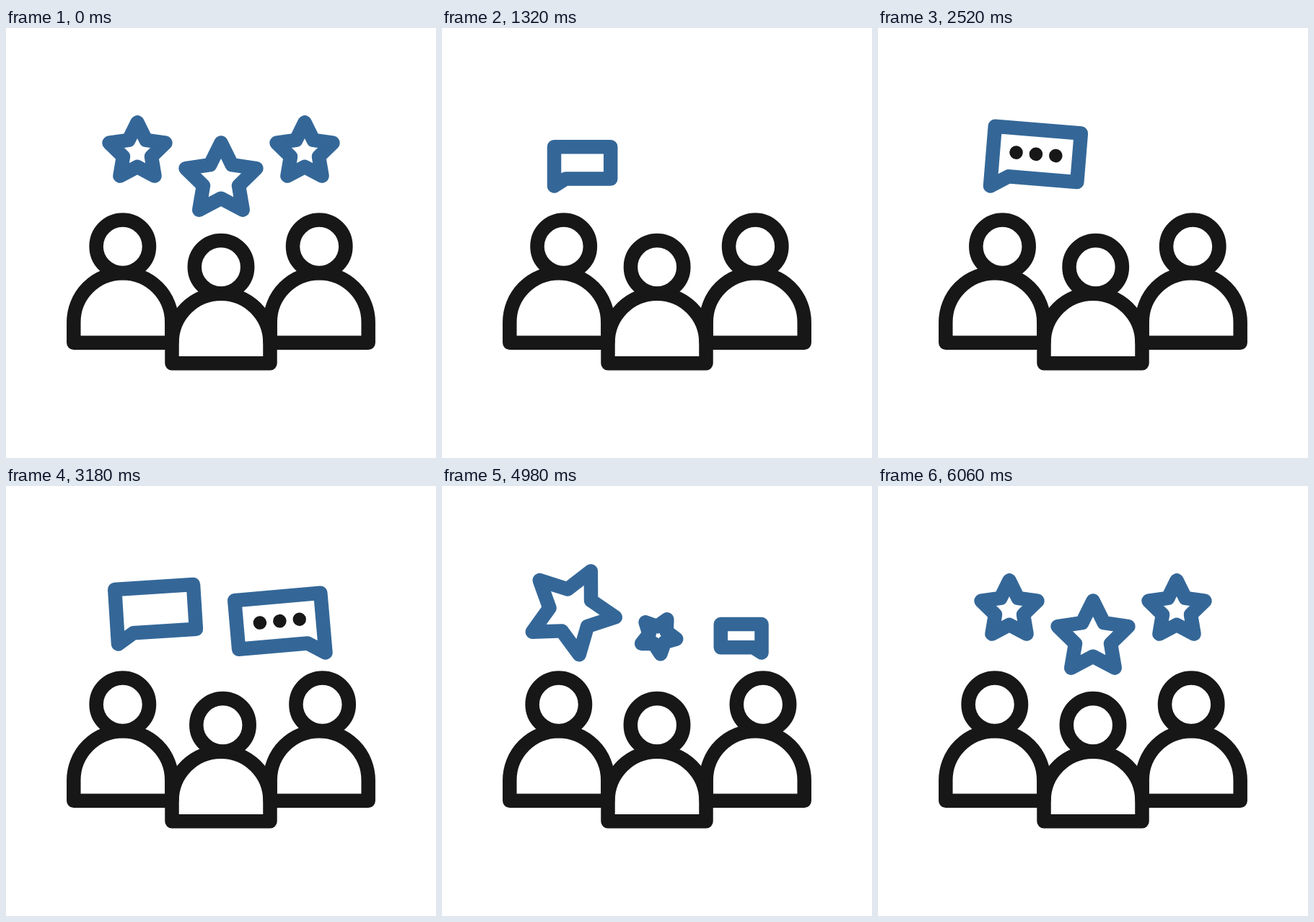
These frames come from a looping animation (596 by 596 pixels, 6300 ms). An HTML page with a canvas:

```html
<!DOCTYPE html>
<html lang="en">
<head>
<meta charset="utf-8">
<title>Team feedback</title>
<style>
  html, body { margin: 0; width: 100%; height: 100%; overflow: hidden; background: #fff; }
  canvas { display: block; width: 596px; height: 596px; }
</style>
</head>
<body>
<canvas id="stage" width="596" height="596"></canvas>
<script>
const ctx = document.getElementById('stage').getContext('2d');
const LOOP = 6300, STEP = 30, LAST = 6060;
const BLUE = '#346798', INK = '#171717', LINE = 19.5;
const RAD = Math.PI / 180;

const people = [
  { x: 161.8, y: 302.7, nod: 0, beat: 1020 },
  { x: 434.2, y: 302.7, nod: 2372, beat: 1037 },
  { x: 298, y: 331.2, nod: 1285, beat: 1030 }
];

// hide / show: when each star starts to leave and to return
const stars = [
  { x: 182, y: 168, r: 41, peak: 1.5, hide: 114, show: 4515 },
  { x: 298, y: 205.6, r: 51.5, peak: 1.31, hide: 262, show: 4790 },
  { x: 414, y: 168, r: 41, peak: 1.5, hide: 400, show: 5155 }
];

// side: direction from the tail to the rest of the bubble
const bubbles = [
  { x: 155.5, y: 219, side: 1, dots: [1450, 2850],
    size: [[1080, 0], [1480, 1], [3090, 1], [3560, 0]],
    tilt: [[1380, 0], [1690, 5], [2130, -5], [2570, 5], [3010, -5], [3490, 0]] },
  { x: 443, y: 231, side: -1, dots: [2880, 4460],
    size: [[2540, 0], [2940, 1], [4740, 1], [5205, 0]],
    tilt: [[2860, 0], [3165, -5], [3680, 5], [4195, -5], [4700, 5], [4950, 0]] }
];

const wave = u => (1 - Math.cos(Math.PI * u)) / 2;

// Eased value at time t from a list of [time, value] keys
function tween(keys, t) {
  if (t <= keys[0][0]) return keys[0][1];
  for (let i = 1; i < keys.length; i++) {
    const [t0, a] = keys[i - 1], [t1, b] = keys[i];
    if (t < t1) return a + (b - a) * wave((t - t0) / (t1 - t0));
  }
  return keys[keys.length - 1][1];
}

function strokePoly(points, color) {
  ctx.beginPath();
  points.forEach(([x, y]) => ctx.lineTo(x, y));
  ctx.closePath();
  ctx.strokeStyle = color;
  ctx.stroke();
}

function placed(x, y, degrees, draw) {
  ctx.save();
  ctx.translate(x, y);
  ctx.rotate(degrees * RAD);
  draw();
  ctx.restore();
}

function drawPerson(p, t) {
  const cycles = (t - p.nod) / p.beat;
  const shift = cycles > 0 && cycles < 3 ? 10.8 * wave(2 * cycles) : 0;
  const base = p.y + 133.6, shoulder = p.y + 105.1;
  ctx.strokeStyle = INK;
  ctx.beginPath();
  ctx.moveTo(p.x - 68, base);
  ctx.lineTo(p.x - 68, shoulder);
  ctx.arc(p.x, shoulder, 68, Math.PI, 0);
  ctx.lineTo(p.x + 68, base);
  ctx.closePath();
  ctx.stroke();
  ctx.beginPath();
  ctx.arc(p.x + shift, p.y, 36.7, 0, 2 * Math.PI);
  ctx.stroke();
}

function drawStar(s, t) {
  const { hide, show, peak } = s;
  const size = tween([[hide, 1], [hide + 450, peak], [hide + 900, 0],
                      [show, 0], [show + 450, peak], [show + 900, 1]], t);
  if (size < 0.005) return;
  const turn = t < 3000
    ? tween([[hide, 0], [hide + 450, -26], [hide + 900, 86]], t)
    : tween([[show, -86], [show + 450, 26], [show + 900, 0]], t);
  const r = s.r * size;
  const points = Array.from({ length: 10 }, (_, i) => {
    const a = i * 36 * RAD, d = i % 2 ? r / 2 : r;
    return [d * Math.sin(a), 0.095 * r - d * Math.cos(a)];
  });
  placed(s.x, s.y, turn, () => strokePoly(points, BLUE));
}

function drawBubble(b, t) {
  const size = tween(b.size, t);
  if (size < 0.005) return;
  const shape = [[0, 0], [0, -83], [119.5, -83], [119.5, -15.2], [24, -15.2]];
  placed(b.x, b.y, tween(b.tilt, t), () => {
    strokePoly(shape.map(([x, y]) => [x * size * b.side, y * size]), BLUE);
    ctx.fillStyle = INK;
    for (let i = 0; i < 3; i++) {
      const [on, off] = b.dots.map(d => d + i * 80);
      const r = 9.3 * tween([[on, 0], [on + 150, 1], [off, 1], [off + 150, 0]], t);
      const column = b.side > 0 ? i : 2 - i;
      ctx.beginPath();
      ctx.arc(b.side * (32.1 + 27.5 * column), -49.2, r, 0, 2 * Math.PI);
      ctx.fill();
    }
  });
}

function draw(t) {
  ctx.fillStyle = '#fff';
  ctx.fillRect(0, 0, 596, 596);
  ctx.lineWidth = LINE;
  ctx.lineJoin = 'round';
  people.forEach(p => drawPerson(p, t));
  stars.forEach(s => drawStar(s, t));
  bubbles.forEach(b => drawBubble(b, t));
}

const start = performance.now();
function tick() {
  const t = Math.max(0, performance.now() - start) % LOOP;
  draw(Math.min(LAST, Math.floor(t / STEP) * STEP));
  requestAnimationFrame(tick);
}
tick();
</script>
</body>
</html>
```
